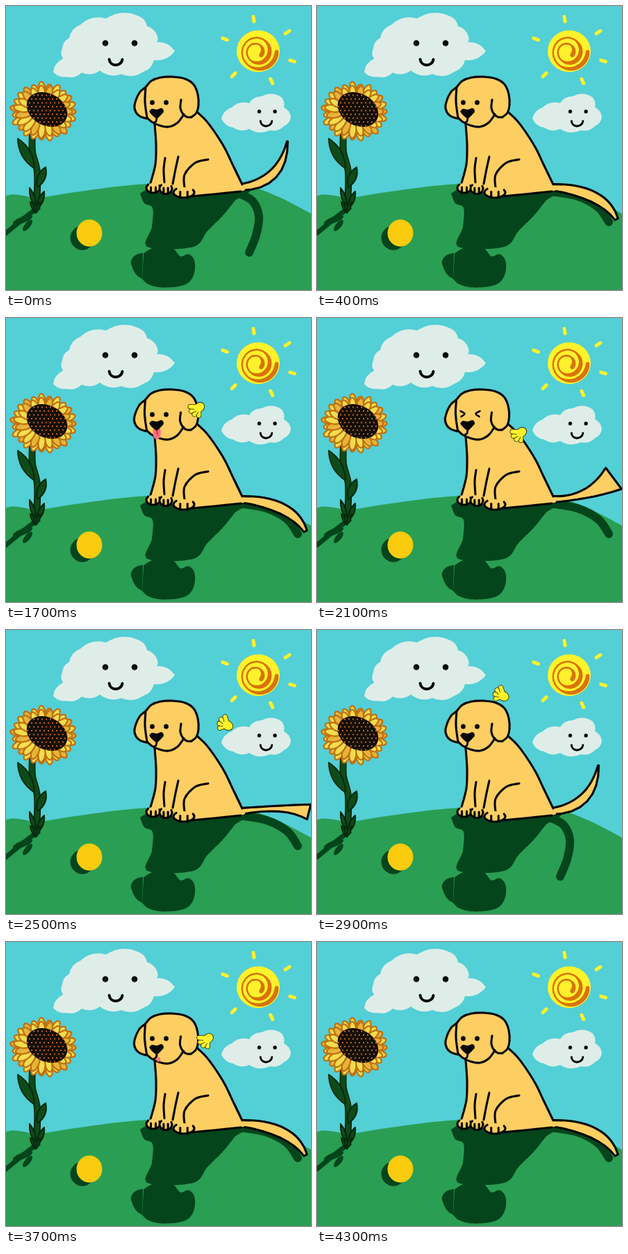
An HTML page with a canvas for the animation above (4400 ms loop, 439 by 409 pixels).

```html
<!DOCTYPE html>
<html lang="en">
<head>
<meta charset="utf-8">
<title>Petting the dog</title>
<style>
html, body { margin: 0; width: 100%; height: 100%; overflow: hidden; background: #53cfd6; }
canvas { display: block; width: 439px; height: 409px; }
</style>
</head>
<body>
<canvas id="stage" width="439" height="409"></canvas>
<script>
const ctx = document.getElementById('stage').getContext('2d');
const STEP = 100, FRAMES = 44, TAU = Math.PI * 2;
const INK = '#050505', SKY = '#53cfd6', GRASS = '#2a9e53', SHADE = '#04451c';
const CLOUD = '#deede8', FUR = '#fdce62', YELLOW = '#fff22a', ORANGE = '#d9730a';

const mix = (a, b, f) => a + (b - a) * f;

// Smooth open curve through flat [x, y, x, y, ...] points.
function curve(p) {
  const path = new Path2D(), last = p.length / 2 - 1;
  const at = i => {
    i = Math.max(0, Math.min(last, i));
    return [p[2 * i], p[2 * i + 1]];
  };
  path.moveTo(p[0], p[1]);
  for (let i = 0; i < last; i++) {
    const [a, b, c, d] = [at(i - 1), at(i), at(i + 1), at(i + 2)];
    path.bezierCurveTo(b[0] + (c[0] - a[0]) / 6, b[1] + (c[1] - a[1]) / 6,
      c[0] - (d[0] - b[0]) / 6, c[1] - (d[1] - b[1]) / 6, c[0], c[1]);
  }
  return path;
}

function fill(path, color) {
  ctx.fillStyle = color;
  ctx.fill(path);
}

function stroke(path, color = INK, width = 3.1) {
  ctx.strokeStyle = color;
  ctx.lineWidth = width;
  ctx.stroke(path);
}

const blob = (p, color) => fill(curve(p), color);
const line = (p, color, width) => stroke(curve(p), color, width);

function oval(x, y, rx, ry, color, turn = 0) {
  const path = new Path2D();
  path.ellipse(x, y, rx, ry, turn, 0, TAU);
  fill(path, color);
  return path;
}

function arc(x, y, rx, ry, from, to, color, width) {
  const path = new Path2D();
  path.ellipse(x, y, rx, ry, 0, from, to);
  stroke(path, color, width);
}

// Cloud outline: an outward puff between each pair of clockwise corners.
function puffs(p) {
  const path = new Path2D(), n = p.length;
  path.moveTo(p[0], p[1]);
  for (let i = 0; i < n; i += 2) {
    const x = p[i], y = p[i + 1], u = p[(i + 2) % n], v = p[(i + 3) % n];
    path.quadraticCurveTo((x + u) / 2 + (v - y) * 0.28, (y + v) / 2 - (u - x) * 0.28, u, v);
  }
  fill(path, CLOUD);
}

function smile(x, y, gap, eye) {
  for (const side of [-1, 1]) oval(x + side * gap, y, eye, eye, INK);
}

function drawClouds() {
  puffs([68, 95, 82, 76, 81, 61, 91, 46, 107, 27, 144, 18, 192, 15, 203, 29, 218, 44, 217, 52,
    243, 65, 213, 78, 197, 95, 166, 98, 135, 93, 109, 96, 87, 102]);
  smile(164, 53.5, 21, 4.3);
  arc(158, 76, 9.5, 9, 0.1, 3.05, INK, 4);
  puffs([310, 162, 325, 146, 350, 140, 368, 130, 396, 131, 400, 146, 410, 160, 400, 173,
    380, 179, 350, 177, 327, 175]);
  smile(375.8, 152, 11.3, 2.7);
  arc(374.5, 165, 8.3, 8, 0.1, 3.05, INK, 3);
}

function drawSun() {
  oval(363, 65, 31, 30, YELLOW);
  // The band of the spiral swells towards the lower right.
  for (let a = 0; a < 13; a += 0.1) {
    const r = 26.5 - a * 1.35;
    arc(363 - a * 0.25, 66, r, r, a, a + 0.14, ORANGE, 2.2 + 3.8 * Math.max(0, Math.cos(a - 0.5)));
  }
  for (const deg of [-98, -33, 16, 66, 136, 200]) {
    const a = deg / 360 * TAU, c = Math.cos(a), s = Math.sin(a), r = 46 + 5 * c * c;
    line([363 + c * (r - 3), 65 + s * (r - 3), 363 + c * (r + 4), 65 + s * (r + 4)], YELLOW, 5);
  }
}

function drawGround() {
  blob([-9, 420, -9, 284, 50, 276, 100, 268, 160, 260, 205, 256, 270, 252, 340, 257, 388, 273,
    439, 299, 460, 312, 460, 420], GRASS);
}

function leaf(x, y, u, v, width) {
  const path = new Path2D(), mx = (x + u) / 2, my = (y + v) / 2;
  const len = Math.hypot(u - x, v - y), nx = (y - v) / len * width, ny = (u - x) / len * width;
  path.moveTo(x, y);
  path.quadraticCurveTo(mx + nx, my + ny, u, v);
  path.quadraticCurveTo(mx - nx, my - ny, x, y);
  fill(path, '#0f4a1a');
  stroke(path, '#072a0e', 2);
}

function drawFlower() {
  line([46, 291, 28, 304, 0, 327], SHADE, 7);
  oval(24, 308, 15, 4.5, SHADE, -0.35);
  oval(31, 316, 10, 4, SHADE, -0.9);

  const stem = [38, 184, 38, 210, 45, 240, 44, 290];
  line(stem, '#072a0e', 10);
  line(stem, '#0f4a1a', 6.5);
  leaf(17, 191, 41, 234, 13);
  leaf(57, 232, 45, 261, 11);
  leaf(34, 262, 43, 290, 6);
  leaf(55, 267, 45, 292, 7);
  for (const dx of [-8, -2, 6]) leaf(43, 298, 43 + dx, 282, 4);

  for (const [count, size] of [[23, 1], [19, 0.86]]) {
    for (let i = 0; i < count; i++) {
      const a = i / count * TAU, reach = size * (1 + 0.05 * Math.sin(i * 2.7));
      const petal = oval(54 + Math.cos(a) * 35 * reach, 152 + Math.sin(a) * 30 * reach,
        11.5, 5, i % 3 ? '#f2dc50' : '#e6b43a', a);
      stroke(petal, '#c0700f', 2.2);
    }
  }
  const disc = oval(59, 149, 31, 23, '#160e08', 0.5);
  ctx.save();
  ctx.clip(disc);
  ctx.fillStyle = '#b9651a';
  for (let row = 0; row < 10; row++)
    for (let col = 0; col < 11; col++)
      ctx.fillRect(30 + col * 6 + row % 2 * 3, 122 + row * 5.5, 2, 2);
  ctx.restore();
}

function drawCoin() {
  oval(110, 334, 17.5, 17.5, SHADE);
  oval(120, 327, 18.5, 19.5, '#f9cb0c');
}

// Tail poses from hanging to raised: bend, tip, half width at the tip, swell along the way.
const tails = [
  { bend: [411, 266], tip: [431, 307], end: 2.5, swell: 3.5 },
  { bend: [428, 250], tip: [431, 313], end: 1.5, swell: 1 },
  { bend: [400, 253], tip: [436, 262], end: 11, swell: -2 },
  { bend: [387, 261], tip: [427, 231], end: 19, swell: -2 },
  { bend: [397, 256], tip: [405, 195], end: 0.5, swell: 3 }
];

// The tail swings as a cosine: once down at the start, then twice while petted.
function tailAt(step) {
  const phase = step < 4 ? step : step >= 19 && step <= 32 ? step - 29 : null;
  return phase === null ? 0 : Math.round(2.65 + 1.45 * Math.cos(phase / 6.5 * TAU));
}

function drawTail({ bend, tip, end, swell }) {
  const over = [], under = [];
  for (let i = 0; i <= 8; i++) {
    const t = i / 8, [x, y] = [0, 1].map(k =>
      mix(mix([338, 261][k], bend[k], t), mix(bend[k], tip[k], t), t));
    const dx = mix(bend[0] - 338, tip[0] - bend[0], t), dy = mix(bend[1] - 261, tip[1] - bend[1], t);
    const w = (mix(4.5, end, t * t) + swell * Math.sin(t * Math.PI)) / Math.hypot(dx, dy);
    over.push(x + dy * w, y - dx * w);
    under.unshift([x - dy * w, y + dx * w]);
  }
  const path = curve(over), back = under.flat();
  path.lineTo(back[0], back[1]);
  for (let i = 2; i < back.length; i += 2) path.lineTo(back[i], back[i + 1]);
  fill(path, FUR);
  stroke(path);
}

const skull = [201, 117, 209, 108, 222, 103, 240, 102, 258, 105, 270, 113, 276, 127, 277, 143,
  274, 154, 267, 160];
const jaw = [256, 156, 247, 168, 234, 174, 221, 172, 210, 167, 203, 161];
const ear = [201, 117, 192, 125, 185, 143, 187, 153, 193, 159, 202, 162];

function drawShadow(raised) {
  blob([193, 270, 199, 284, 211, 291, 210, 318, 204, 347, 269, 347, 290, 324, 312, 302, 329, 281,
    345, 262, 205, 262], SHADE);
  // The head is cast upside down onto the hill.
  ctx.save();
  ctx.transform(1, 0, 0, -0.83, -5, 490);
  blob([...skull, ...jaw], SHADE);
  blob(ear, SHADE);
  ctx.restore();
  line(raised ? [335, 270, 355, 281, 364, 303, 360, 330, 350, 355]
    : [335, 267, 375, 274, 405, 290, 420, 311], SHADE, 12);
}

function paw(x, y, rx, ry) {
  oval(x, y, rx, ry, FUR);
  arc(x, y, rx, ry, -0.5, 3.9);
  for (const side of [-0.35, 0.35]) line([x + side * rx, y - 1, x + side * rx, y + ry]);
}

function drawBody() {
  const back = [272, 150, 287, 164, 300, 181, 315, 205, 326, 228, 340, 257];
  const chest = [208, 255, 215, 228, 216, 200, 214, 170];
  blob([...back, 338, 267, 270, 273, 240, 268, 204, 266, ...chest], FUR);
  line(back);
  line(chest);
  line([338, 267, 300, 271, 268, 274]);
  line([229, 219, 227, 235, 228, 254]);
  line([248, 217, 244, 235, 240, 256]);
  line([291, 221, 272, 226, 257, 243, 257, 262]);
  paw(212, 262, 10, 7);
  paw(230, 263, 9, 7.5);
  paw(256, 268.5, 15, 7.5);
}

function drawFace(petted) {
  const tongue = petted >= 0 && petted < 7 ? Math.sin(petted / 7 * Math.PI) ** 2 : 0;
  for (const side of [-1, 1]) {
    const x = 220.5 + side * 10;
    if (petted >= 7) line([x + side * 4, 134, x - side * 2, 138, x + side * 3, 142], INK, 2.6);
    else oval(x, 139, 3.4, 3.5, INK);
  }
  if (tongue) {
    const size = 2 + tongue * 8;
    oval(mix(220, 217, tongue), mix(170, 165, tongue), 2 + tongue * 4, size, '#ff7180');
    line([217, 163, 218, 163 + tongue * 5], '#df3049', 2);
  }
  blob([206, 152, 210, 148, 217, 149, 224, 147, 227, 152, 222, 158, 217, 162, 211, 158, 206, 152], INK);
  if (tongue < 0.5) line([217, 160, 216, 166, 213, 168], INK, 2.8);
}

function drawHead(petted) {
  ctx.save();
  if (petted >= 0) ctx.translate(-0.5, 1);
  blob([...skull, ...jaw], FUR);
  blob(ear, FUR);
  for (const part of [skull, jaw, ear]) line(part);
  line([252, 135, 251, 147, 255, 156, 261, 160, 267, 160]);
  line([201, 117, 200, 138, 203, 161]);
  ctx.restore();
  drawFace(petted);
}

// Two strokes over head and back: step, x, y.
const strokes = [[6, 313, 104], [10, 273.5, 92.5], [13, 245, 101], [17, 273, 131], [21, 289, 167],
  [25, 315, 133.5], [28, 272, 87], [32, 241.5, 104], [36, 274, 132], [42, 344.5, 187]];

function drawHand(step, petted) {
  if (step < 6 || step > 42) return;
  const i = Math.max(1, strokes.findIndex(k => k[0] >= step));
  const a = strokes[i - 1], b = strokes[i], f = (step - a[0]) / (b[0] - a[0]);
  const edge = '#2b2a00';
  ctx.save();
  ctx.translate(mix(a[1], b[1], f), mix(a[2], b[2], f));
  if (petted >= 0) ctx.rotate(petted < 2 ? -0.7 : -1.2);
  oval(4, 4, 8.5, 7, edge, 0.5);
  for (let k = 0; k < 4; k++) {
    const angle = 2.75 + k * 0.55;
    const finger = [4 + 12 * Math.cos(angle), 3 + 12 * Math.sin(angle), 4, 3];
    line(finger, edge, 7.4);
    line(finger, YELLOW, 5.8);
  }
  oval(4, 4, 7.6, 6.2, YELLOW, 0.5);
  ctx.restore();
}

function draw(step) {
  const level = tailAt(step);
  const petted = step < 13 || (step - 13) % 18 > 9 ? -1 : (step - 13) % 18;
  ctx.fillStyle = SKY;
  ctx.fillRect(0, 0, 439, 409);
  drawClouds();
  drawSun();
  drawGround();
  drawFlower();
  drawCoin();
  drawShadow(level === 4);
  drawTail(tails[level]);
  drawBody();
  drawHead(petted);
  drawHand(step, petted);
}

ctx.lineCap = ctx.lineJoin = 'round';
const start = performance.now();
function tick() {
  const t = Math.max(0, performance.now() - start);
  draw(Math.floor(t / STEP) % FRAMES);
  requestAnimationFrame(tick);
}
tick();
</script>
</body>
</html>
```
